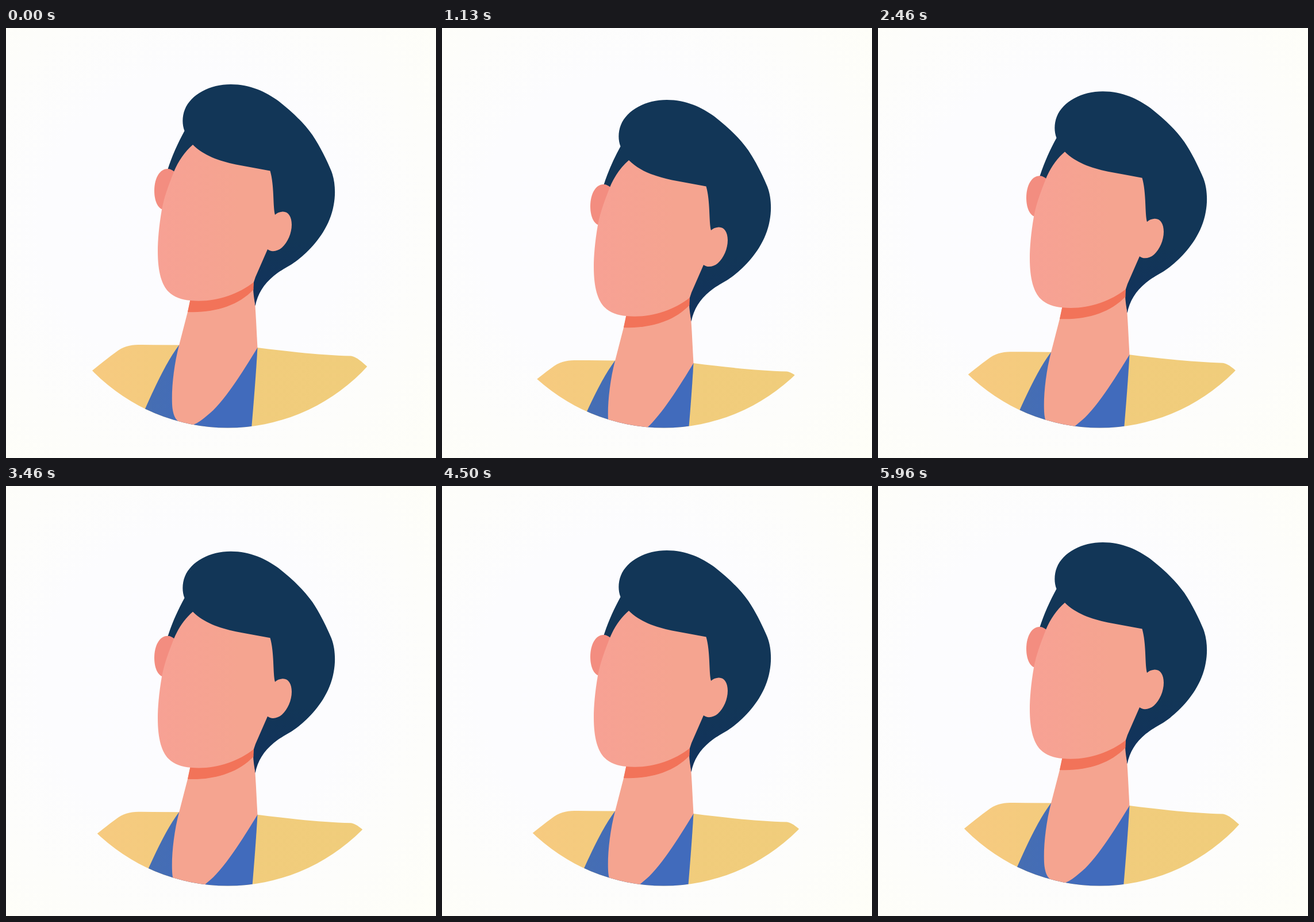
An HTML page for the animation above (6 s loop, 748 px wide and 748 px high).

```html
<!DOCTYPE html>
<html lang="en">
<head>
<meta charset="utf-8">
<title>Bobbing portrait</title>
<style>
  html, body { margin: 0; width: 100%; height: 100%; overflow: hidden; }
  body { background: radial-gradient(circle at 44% 46%, #fcfcff 0, #fcfcfe 45%, #fefef7 100%); }
  svg { display: block; width: 100vw; height: 100vh; }
</style>
</head>
<body>
<svg viewBox="0 0 748 748">
  <defs>
    <clipPath id="disc"><circle cx="385.8" cy="366.5" r="329"/></clipPath>
    <linearGradient id="jacket"><stop stop-color="#f7ca80"/><stop offset=".5" stop-color="#f1cc7c"/><stop offset="1" stop-color="#f0cd7b"/></linearGradient>
    <linearGradient id="shirt"><stop stop-color="#466eb2"/><stop offset=".6" stop-color="#416bbc"/></linearGradient>
    <linearGradient id="skin"><stop stop-color="#f7a194"/><stop offset=".6" stop-color="#f5a490"/></linearGradient>
    <linearGradient id="hair" x2="0" y2="1"><stop offset=".7" stop-color="#123657"/><stop offset="1" stop-color="#12325d"/></linearGradient>
  </defs>
  <g clip-path="url(#disc)">
    <g id="figure">
      <path fill="url(#jacket)" d="M140 604C160 588 178 573 195 561C208 552 220 551 236 551L301 551.5L437.5 556C500 564 550 569 600 570.5C606 571 613 576 618 580L640 599V720H140Z"/>
      <path fill="url(#shirt)" d="M301 551.5C281 578 262 617 240 667V720H425L427 697C431 650 435 600 437.5 556Z"/>
      <path fill="url(#hair)" d="M310.5 179C306 168 306.5 153 311 142C322 115 355 98 391 98C425 98 452 111 474 127C497 145 518 165 533 186C547 207 558 230 566 249C573 267 573.5 290 570 308C564 343 542 372 523 390C497 415 486 415 466 431C448 446 438 462 433.5 484L425 440L300 300L281 247C289 222 299 200 310.5 179Z"/>
      <path fill="#f5a490" d="M325 455L316 494L301 552C291 590 287 635 289.500 661C291.500 676 296 682 301 685C309 693 317 693 326 690C334 687 342 681 350 674C377 654 412 598 437.500 556C436 530 435 505 433.500 484C432 472 430 462 430 451L431 440Z"/>
      <path fill="#f27359" d="M321 470L316 494C362 496 404 483 430.500 455L431 438Z"/>
      <path fill="#f38d80" d="M273 316C263 313 258 299 258 283C258 262 267 245 281 245C286 245 289 247 293 250L300 270Z"/>
      <path fill="url(#skin)" d="M325 203C311 215 300 231 292 250C284 271 276 290 271 316C266 345 264 370 264 388C264 425 271 447 283 459C292 468 306 473 321 474C360 478 402 465 431 442L434 433L455 385C461 390 472 389 480 382C490 373 497 357 497 342C497 328 491 319 481 319.500C475 320 471 322 468 325C464 310 467 275 459.500 248.500L400 237.500C370 231 344 222 325 203Z"/>
    </g>
  </g>
</svg>
<script>
  const figure = document.getElementById('figure');
  const FPS = 24, PERIOD = 2, DROP = 28;

  function draw(now) {
    // the small lead matches steps rounded to 10 ms
    const t = Math.floor((now + 3.4) * FPS / 1000) / FPS;
    const y = DROP * (1 - Math.cos(2 * Math.PI * t / PERIOD)) / 2;
    figure.setAttribute('transform', `translate(0 ${y.toFixed(2)})`);
    requestAnimationFrame(() => draw(performance.now() - start));
  }

  const start = performance.now();
  draw(0);
</script>
</body>
</html>
```
